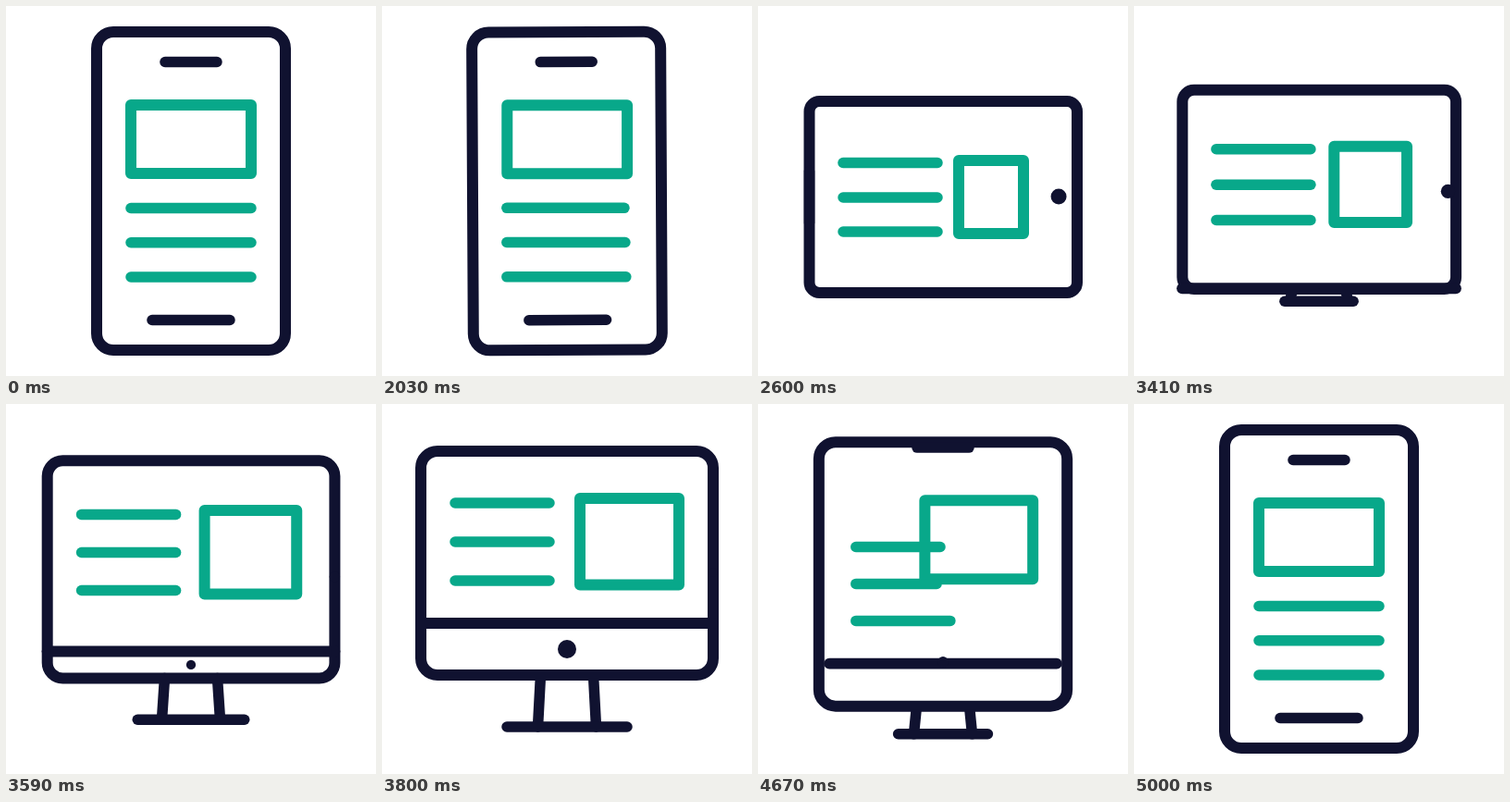
Animation of 400 by 400 pixels, one loop 5030 ms. Source, as an HTML page with a canvas:

```html
<!DOCTYPE html>
<html lang="en">
<head>
<meta charset="utf-8">
<title>Responsive devices</title>
<style>
  html, body { margin: 0; width: 100%; height: 100%; overflow: hidden; background: #fff; }
  canvas { display: block; width: 100vw; height: 100vh; }
</style>
</head>
<body>
<canvas></canvas>
<script>
const LOOP = 5030, STEP = 30, STEPS = 20;
const STARTS = [2000, 3200, 4400];
const DARK = '#101230', GREEN = '#08a88a';
const FRAME = 12, THIN = 11.5;

const canvas = document.querySelector('canvas');
const ctx = canvas.getContext('2d');
const dpr = window.devicePixelRatio || 1;
canvas.width = canvas.height = 400 * dpr;

// Centre lines of each device: body = [x1, y1, x2, y2, radius]
const phone = {
  body: [98, 28, 302, 372, 18],
  box: [135, 107, 265, 181],
  rows: [218.5, 255.7, 293], left: 135, right: 265
};
const tablet = {
  body: [55.5, 103, 345, 310, 11],
  box: [217, 167, 287, 246],
  rows: [169.5, 207, 244], left: 92, right: 194
};
const monitor = {
  body: [42, 51, 358, 293, 18],
  box: [214, 102, 321, 195.5],
  rows: [107, 149, 191], left: 79, right: 181
};

const mix = (a, b, p) => a + (b - a) * p;
const mixAll = (a, b, p) => a.map((v, i) => mix(v, b[i], p));

// cubic-bezier(.51, 0, .45, 1)
function ease(x) {
  if (x <= 0 || x >= 1) return x <= 0 ? 0 : 1;
  let lo = 0, hi = 1, s;
  for (let i = 0; i < 30; i++) {
    s = (lo + hi) / 2;
    const r = 1 - s;
    if (3 * r * r * s * 0.51 + 3 * r * s * s * 0.45 + s * s * s < x) lo = s;
    else hi = s;
  }
  return s * s * (3 - 2 * s);
}

function line(x1, y1, x2, y2, color = DARK, width = THIN) {
  ctx.strokeStyle = color;
  ctx.lineWidth = width;
  ctx.beginPath();
  ctx.moveTo(x1, y1);
  ctx.lineTo(x2, y2);
  ctx.stroke();
}

function bar(x, y, half, width) {
  line(x - half, y, x + half, y, DARK, width);
}

function dot(x, y, r) {
  ctx.fillStyle = DARK;
  ctx.beginPath();
  ctx.arc(x, y, Math.max(r, 0), 0, Math.PI * 2);
  ctx.fill();
}

function body([x1, y1, x2, y2, r]) {
  ctx.strokeStyle = DARK;
  ctx.lineWidth = FRAME;
  ctx.beginPath();
  ctx.roundRect(x1, y1, x2 - x1, y2 - y1, r);
  ctx.stroke();
}

// dips: how far the right end of each row pulls in halfway through
function content(a, b, p, u, dips, nudge) {
  const hump = Math.sin(Math.PI * u);
  const [x1, y1, x2, y2] = mixAll(a.box, b.box, p);
  ctx.strokeStyle = GREEN;
  ctx.lineWidth = FRAME;
  ctx.strokeRect(x1, y1, x2 - x1, y2 - y1);
  mixAll(a.rows, b.rows, p).forEach((y, i) => {
    line(mix(a.left, b.left, p) + nudge * hump, y,
         mix(a.right, b.right, p) - dips[i] * hump, y, GREEN);
  });
}

function stand(top, y, half) {
  line(171.5, top, 168.5, y);
  line(228.5, top, 231.5, y);
  bar(200, y, half);
}

function phoneToTablet(p, u) {
  const w = mix(204, 207, p) / 2, h = mix(344, 289.5, p) / 2;
  ctx.save();
  ctx.translate(200 + 0.25 * p - 2.5 * Math.sin(Math.PI * p), mix(200, 206.5, p));
  ctx.rotate(-p * Math.PI / 2);
  body([-w, -h, w, h, mix(18, 11, p)]);
  bar(0, mix(-139.5, -h, p), 28);
  bar(mix(0, 0.5, p), mix(139.5, 124.8, p), mix(42, 0.01, p), mix(THIN, 17, p));
  ctx.restore();
  content(phone, tablet, p, u, [18, 12, 6], 0);
}

function tabletToMonitor(p, u) {
  const b = mixAll(tablet.body, monitor.body, p);
  const rise = p ** 3, half = (b[2] - b[0]) / 2;
  stand(b[3], mix(310, 349, p), mix(28.5, 65, p));
  body(b);
  dot(Math.min(325 + 61 * p, b[2]), mix(206, 182, p), mix(8.5, 5, p));
  bar(200, b[3] - 56 * rise, half, FRAME);
  dot(200, b[3] - 28 * rise, 10 * rise);
  content(tablet, monitor, p, u, [0, 0, 0], 0);
}

function monitorToPhone(p, u) {
  const b = mixAll(monitor.body, phone.body, p);
  const chin = mix(237, 339.5, p);
  const drop = p < 0.44 ? 28 - 70 * p : -2.8 * (1 - p) / 0.56;
  stand(b[3], mix(349, 372, p ** 1.27), mix(65, 26, p));
  body(b);
  bar(200, b[1] + 32.5 * p * p, 28);
  bar(200, chin, mix(158, 42, p ** 1.4), mix(FRAME, THIN, p));
  dot(200, chin + drop, 10 * (1 - p));
  content(monitor, phone, p, u, [20, 24, 9], 3);
}

const scenes = [phoneToTablet, tabletToMonitor, monitorToPhone];

function draw() {
  const t = performance.now() % LOOP;
  const i = t < STARTS[1] ? 0 : t < STARTS[2] ? 1 : 2;
  const step = Math.floor((t - STARTS[i]) / STEP);
  const u = Math.min(Math.max(step / STEPS, 0), 1);
  ctx.setTransform(dpr, 0, 0, dpr, 0, 0);
  ctx.fillStyle = '#fff';
  ctx.fillRect(0, 0, 400, 400);
  ctx.lineCap = ctx.lineJoin = 'round';
  if (i === 2 && u === 1) phoneToTablet(0, 0);
  else scenes[i](ease(u), u);
  requestAnimationFrame(draw);
}
draw();
</script>
</body>
</html>
```
